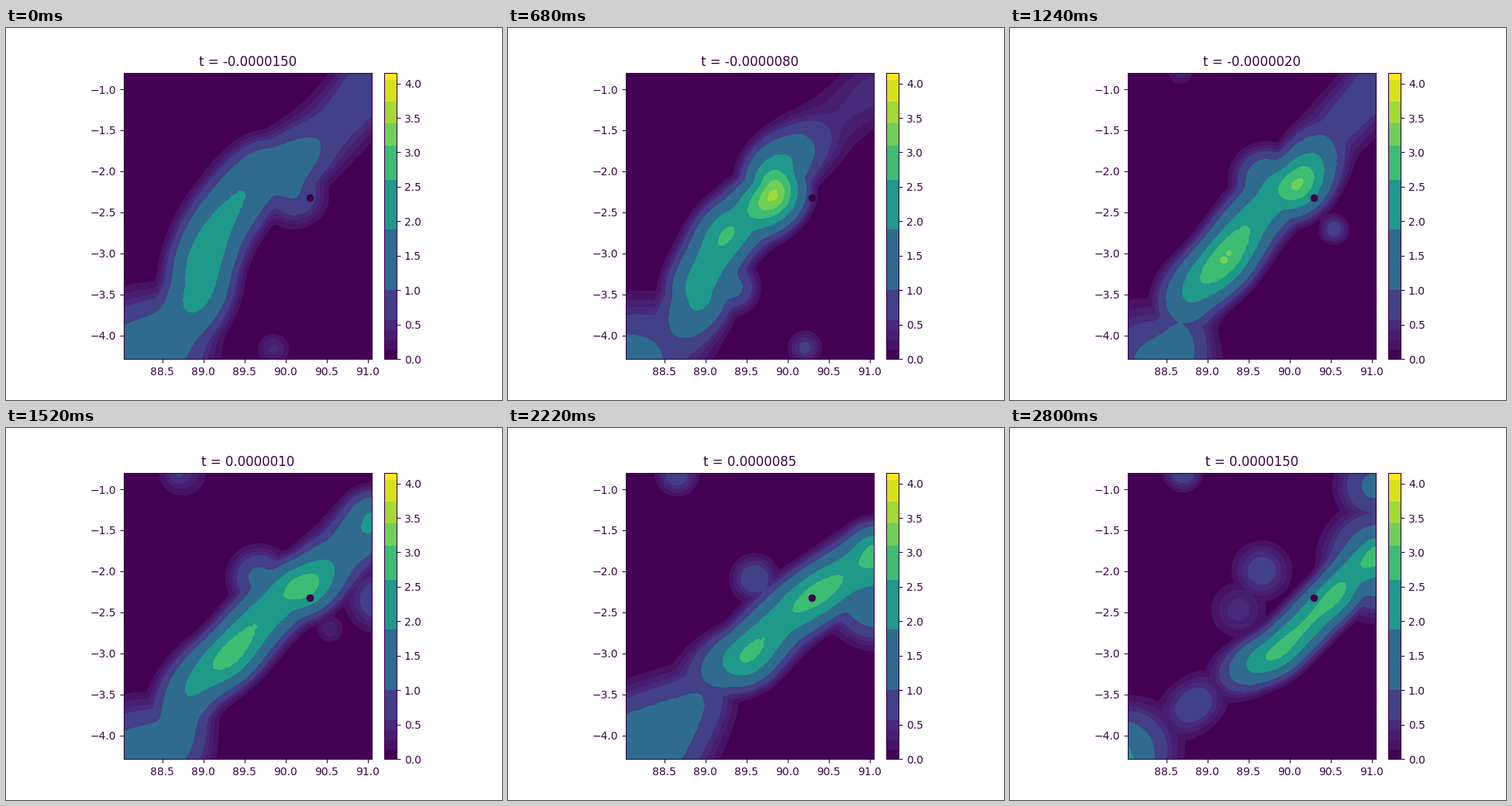
A matplotlib script that plays this animation: 640x480 px, repeating every 2.82 s.

```python
import numpy as np
import matplotlib.pyplot as plt
from matplotlib.animation import FuncAnimation
from matplotlib.cm import ScalarMappable
from matplotlib.colors import BoundaryNorm, ListedColormap

W, H = 640, 480
LEFT, RIGHT, TOP, BOTTOM = 152, 472, 57.6, 427.2
INK = "#3c0349"
PEAK = 4.157
LEVELS = [0, .14, .28, .42, .567, 1.005, 1.88, 2.6, 3.1, 3.42, 3.74, 4.05, PEAK]
VIRIDIS = plt.get_cmap("viridis")
COLORS = VIRIDIS((np.array(LEVELS[:-1]) + LEVELS[1:]) / 2 / PEAK)
COLORS[[0, -1]] = VIRIDIS([0.0, 1.0])
RGB = (COLORS[:, :3] * 255).round().astype(np.uint8)

# The field is computed on a coarse grid and enlarged linearly to pixels
CELL = 2
gx = np.arange(LEFT - 2, RIGHT + 4, CELL)
gy = np.arange(56, 432, CELL)
GX, GY = np.meshgrid(gx, gy)


def enlarge(start, n, grid):
    p = start + .5 + np.arange(n)
    return np.maximum(0, 1 - abs(p[:, None] - grid) / CELL)


WX, WY = enlarge(LEFT, 320, gx), enlarge(TOP, 370, gy)

SAMPLES = 61
TAIL = 1 + .9 * np.exp(-(np.linspace(0, 1, SAMPLES) / .1) ** 2)


def spline(knots):
    """Catmull-Rom curve through (x, y, height) knots, evenly sampled."""
    p = np.array(knots, float)
    p = np.vstack([2 * p[0] - p[1], p, 2 * p[-1] - p[-2]])
    s = np.linspace(0, len(knots) - 1, SAMPLES)
    i = np.minimum(s.astype(int), len(knots) - 2)
    u = (s - i)[:, None]
    a, b, c, d = (p[i + j] for j in range(4))
    return b + .5 * u * (c - a + u * (2*a - 5*b + 4*c - d + u * (3*(b - c) + d - a)))


def hump(x, y, radius, height):
    r = np.hypot(GX - x, GY - y) / radius
    return max(height, 0) * np.cos(np.pi / 2 * np.minimum(r, 1)) ** 2


def highest(humps):
    return np.max([hump(*h) for h in humps], axis=0)


poses = []


def pose(step, width, ridge, puffs):
    """Ridge knots are (x, y, height), puffs are (x, y, radius, height)."""
    poses.append((step, width, spline(ridge), highest(puffs)))


pose(0, 68,
     [(158, 445, 1.65), (218, 388, 1.5), (246, 345, 2.2), (257, 298, 2.45),
      (279, 250, 2.15), (325, 193, 1.75), (360, 180, 1.6), (415, 135, .85),
      (465, 80, .95)],
     [(372, 215, 60, 1.0), (345, 415, 32, .45)])
pose(7, 58,
     [(150, 445, 1.9), (225, 400, 1.1), (247, 350, 1.7), (246, 308, 2.5),
      (276, 260, 2.8), (292, 242, 2.5), (311, 221, 2.9), (346, 186, 2.4),
      (380, 160, 1.4), (425, 130, .6), (470, 85, .55)],
     [(375, 215, 60, 1.0), (285, 325, 52, 1.4), (252, 184, 30, .5)])
pose(14, 64,
     [(145, 445, 1.5), (210, 400, .85), (244, 355, 2.0), (247, 333, 2.3),
      (264, 298, 2.4), (282, 268, 2.7), (308, 244, 2.45), (342, 217, 3.5),
      (350, 182, 2.3), (405, 135, .6), (470, 80, .5)],
     [(290, 335, 48, 1.2), (383, 413, 32, .65)])
pose(26, 62,
     [(165, 440, .9), (208, 422, 1.4), (222, 375, 1.0), (235, 342, 2.1),
      (276, 300, 3.15), (315, 247, 2.45), (345, 217, 2.4), (374, 199, 3.15),
      (405, 150, 1.0), (435, 115, .8), (472, 75, .95)],
     [(330, 195, 60, 1.6), (418, 260, 28, .75), (220, 58, 26, .35)])
pose(38, 60,
     [(148, 442, 2.2), (215, 385, 1.5), (238, 338, 2.3), (270, 307, 2.15),
      (305, 287, 2.85), (347, 245, 2.65), (382, 213, 2.65), (414, 216, 3.25),
      (440, 200, 2.3), (473, 168, 3.2)],
     [(480, 222, 60, 1.7), (228, 58, 48, .9), (320, 190, 50, .75)])
pose(47, 62,
     [(150, 435, 1.9), (235, 362, 1.15), (255, 325, .9), (285, 305, 1.9),
      (310, 293, 2.75), (350, 252, 2.4), (380, 228, 2.75), (405, 211, 2.9),
      (445, 183, 2.5), (473, 165, 2.95)],
     [(475, 215, 90, 1.85), (218, 60, 40, .8), (318, 195, 45, .85)])
pose(60, 50,
     [(130, 430, 2.4), (192, 392, 0), (237, 358, .85), (270, 330, .1),
      (316, 305, 2.15), (345, 289, 2.8), (375, 261, 2.7), (395, 240, 2.7),
      (420, 215, 2.85), (442, 188, 2.4), (473, 165, 2.85)],
     [(476, 172, 100, 1.8), (470, 75, 70, 1.15), (325, 185, 55, .75),
      (295, 235, 55, .5), (223, 57, 36, .9)])


def picture(step):
    """Banded colours of the cloud at one time step."""
    i = max(j for j in range(len(poses) - 1) if poses[j][0] <= step)
    (s0, *start), (s1, *end) = poses[i:i + 2]
    u = (step - s0) / (s1 - s0)
    width, ridge, puffs = ((1 - u) * a + u * b for a, b in zip(start, end))
    cloud = highest((x, y, width * t, h) for (x, y, h), t in zip(ridge, TAIL))
    field = (cloud ** 4 + puffs ** 4) ** .25
    return RGB[np.digitize(WY @ field @ WX.T, LEVELS[1:-1])]


plt.rcParams.update({
    "font.family": "DejaVu Sans", "text.color": INK, "axes.edgecolor": INK,
    "axes.titlecolor": INK, "xtick.color": INK, "ytick.color": INK})
fig = plt.figure(figsize=(W / 100, H / 100), dpi=100, facecolor="white")


def box(x0, x1):
    return fig.add_axes([x0 / W, 1 - BOTTOM / H, (x1 - x0) / W, (BOTTOM - TOP) / H])


pictures = [picture(k) for k in range(61)]
ax = box(LEFT, RIGHT)
img = ax.imshow(pictures[0], extent=(88.03, 91.05, -4.286, -.798),
                aspect="auto", interpolation="nearest")
ax.plot(90.293, -2.325, "o", color=INK)
ax.set_xticks(np.arange(88.5, 91.1, .5))
ax.set_yticks(np.arange(-4, -.9, .5))
title = ax.set_title("")

scale = ScalarMappable(BoundaryNorm(LEVELS, len(COLORS)), ListedColormap(COLORS))
bar = fig.colorbar(scale, cax=box(488, 504.2), spacing="proportional",
                   ticks=np.arange(0, 4.1, .5), format="%.1f")
bar.minorticks_off()
bar.outline.set_edgecolor(INK)

# Every third step is held five times as long
STEPS = [k for k in range(61) for _ in range(5 if k % 3 == 1 else 1)]


def update(frame):
    step = STEPS[frame]
    img.set_data(pictures[step])
    title.set_text(f"t = {(step - 30) * 5e-7:.7f}")
    return img, title


anim = FuncAnimation(fig, update, frames=len(STEPS), interval=20,
                     repeat=True, repeat_delay=0, blit=False)
plt.show()
```
